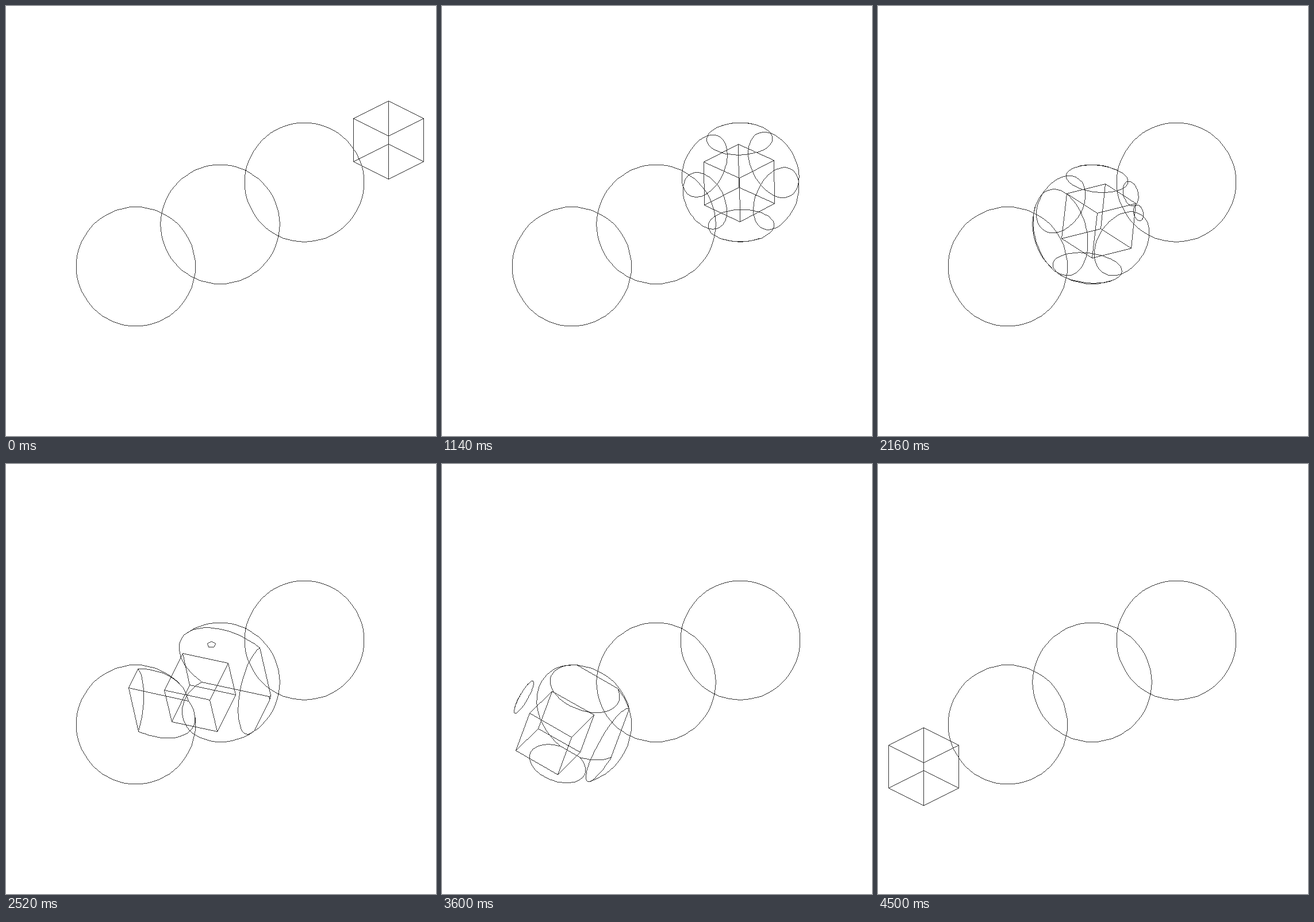
Animation, 748 px wide and 748 px high, one loop 4.53 s. Source, as an HTML page with a canvas:

```html
<!DOCTYPE html>
<html lang="en">
<head>
<meta charset="utf-8">
<title>Cube passing through spheres</title>
<style>
html, body { margin: 0; width: 100%; height: 100%; overflow: hidden; background: #fff; }
canvas { display: block; }
</style>
</head>
<body>
<canvas id="stage" width="748" height="748"></canvas>
<script>
const ctx = document.getElementById('stage').getContext('2d');

const INK = '#333';
const UNIT = 17.27;          // pixels per world unit
const CENTER = [372.45, 379.9];
const RADIUS = 6;
const SPHERES = [-12, 0, 12].map(y => [0, y, 0]);
const CUBE = 2.5;            // half side of the visible cube
const CUTTER = 5;            // half side of the cube subtracted from the spheres
const TRAVEL = 24;
const STEPS = 150;
const STEP_MS = 30;

// Orthographic view: azimuth 45 degrees, elevation 30 degrees
const H = Math.SQRT1_2;
const RIGHT = [H, H, 0];
const UP = [-H / 2, H / 2, Math.sqrt(3) / 2];

const dot = (a, b) => a[0] * b[0] + a[1] * b[1] + a[2] * b[2];
const sub = (a, b) => a.map((v, i) => v - b[i]);
const along = (p, dir, k) => p.map((v, i) => v + dir[i] * k);

function project(p) {
  return [
    Math.floor(CENTER[0] + UNIT * dot(p, RIGHT)),
    Math.floor(CENTER[1] - UNIT * dot(p, UP))
  ];
}

// One pixel wide line without smoothing
function line(p, q) {
  const [x0, y0] = project(p);
  const [x1, y1] = project(q);
  const n = Math.max(Math.abs(x1 - x0), Math.abs(y1 - y0), 1);
  for (let i = 0; i <= n; i++) {
    ctx.fillRect(Math.round(x0 + (x1 - x0) * i / n), Math.round(y0 + (y1 - y0) * i / n), 1, 1);
  }
}

// Circle spanned by u and v, drawn only where visible(point) holds
function circle(c, r, u, v, visible) {
  const n = r < 0.6 ? 5 : 72;
  const at = a => along(along(c, u, r * Math.cos(a)), v, r * Math.sin(a));
  for (let i = 0; i < n; i++) {
    let a = i * 2 * Math.PI / n;
    let b = (i + 1) * 2 * Math.PI / n;
    const seenA = visible(at(a));
    const seenB = visible(at(b));
    if (!seenA && !seenB) continue;
    if (seenA !== seenB) {
      let inside = seenA ? a : b;
      let outside = seenA ? b : a;
      for (let k = 0; k < 12; k++) {
        const mid = (inside + outside) / 2;
        if (visible(at(mid))) inside = mid; else outside = mid;
      }
      if (seenA) b = inside; else a = inside;
    }
    line(at(a), at(b));
  }
}

function cubeEdges(center, axes, half) {
  const edges = [];
  for (let k = 0; k < 3; k++) {
    for (const s of [-half, half]) {
      for (const t of [-half, half]) {
        const mid = along(along(center, axes[(k + 1) % 3], s), axes[(k + 2) % 3], t);
        edges.push([along(mid, axes[k], -half), along(mid, axes[k], half)]);
      }
    }
  }
  return edges;
}

function lineInSphere([p, q], c) {
  const d = sub(q, p);
  const f = sub(p, c);
  const a = dot(d, d);
  const b = dot(d, f);
  const disc = b * b - a * (dot(f, f) - RADIUS * RADIUS);
  if (disc <= 0) return;
  const root = Math.sqrt(disc);
  const from = Math.max(0, (-b - root) / a);
  const to = Math.min(1, (-b + root) / a);
  if (from < to) line(along(p, d, from), along(p, d, to));
}

function drawCutSphere(c, center, axes) {
  const local = (p, k) => dot(sub(p, center), axes[k]);
  const within = (p, k) => Math.abs(local(p, k)) <= CUTTER;

  circle(c, RADIUS, RIGHT, UP, p => !(within(p, 0) && within(p, 1) && within(p, 2)));

  for (let k = 0; k < 3; k++) {
    const i = (k + 1) % 3;
    const j = (k + 2) % 3;
    for (const face of [-CUTTER, CUTTER]) {
      const d = face - local(c, k);
      const rr = RADIUS * RADIUS - d * d;
      if (rr > 0) {
        circle(along(c, axes[k], d), Math.sqrt(rr), axes[i], axes[j],
          p => within(p, i) && within(p, j));
      }
    }
  }

  for (const edge of cubeEdges(center, axes, CUTTER)) lineInSphere(edge, c);
}

function draw(progress) {
  const angle = progress * 2 * Math.PI;
  const co = Math.cos(angle);
  const si = Math.sin(angle);
  const center = [0, TRAVEL * (1 - 2 * progress), 0];
  // Turn about x by -angle, then about z by +angle
  const axes = [
    [co, si, 0],
    [-si * co, co * co, -si],
    [-si * si, co * si, co]
  ];

  ctx.fillStyle = '#fff';
  ctx.fillRect(0, 0, 748, 748);
  ctx.fillStyle = INK;
  for (const c of SPHERES) drawCutSphere(c, center, axes);
  for (const [p, q] of cubeEdges(center, axes, CUBE)) line(p, q);
}

const start = performance.now();
function tick() {
  const elapsed = Math.max(0, performance.now() - start);
  draw(Math.floor(elapsed / STEP_MS) % (STEPS + 1) / STEPS);
  requestAnimationFrame(tick);
}
tick();
</script>
</body>
</html>
```
